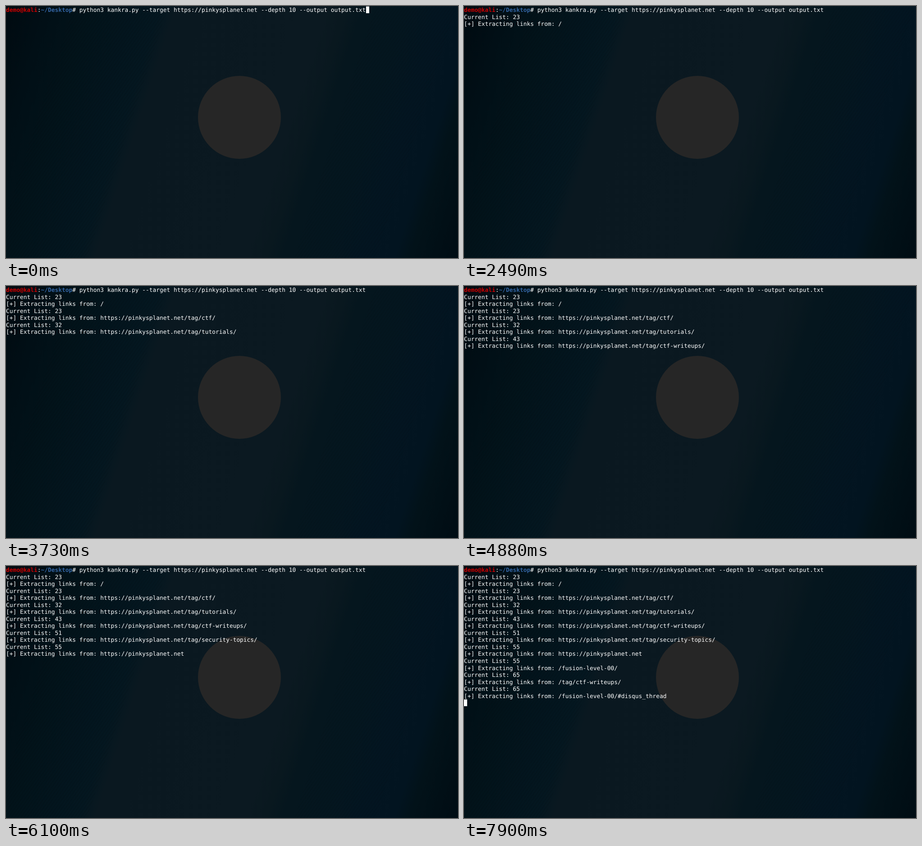
An HTML page with a canvas that plays this animation: 1003x559 px, repeating every 8 s.

```html
<!DOCTYPE html>
<html lang="en">
<head>
<meta charset="utf-8">
<title>Terminal</title>
<style>
  html, body { margin: 0; width: 100%; height: 100%; overflow: hidden; background: #09171f; }
  canvas { display: block; }
</style>
</head>
<body>
<canvas id="stage" width="1003" height="559"></canvas>
<script>
const W = 1003, H = 559, LOOP = 8000;
const ctx = document.getElementById('stage').getContext('2d');

// The terminal is laid out on 8px cells and drawn slightly reduced.
const SCALE = 0.969, CELL = 8, ROW = 15.53, TOP = 0.7, BASELINE = 12.4;
const FONT = '13.29px "DejaVu Sans Mono", monospace';

const SITE = 'https://pinkysplanet.net';
const PROMPT = [
  ['demo@kali', '#cc0000', true],
  [':', '#ffffff', false],
  ['~/Desktop', '#3465a4', true],
  [`# python3 kankra.py --target ${SITE} --depth 10 --output output.txt`, '#ffffff', false]
];
const COMMAND_END = PROMPT.reduce((n, [text]) => n + text.length, 0);

// Each crawl step: time shown, list size, page.
const STEPS = [
  [1900, 23, '/'],
  [2620, 23, SITE + '/tag/ctf/'],
  [3480, 32, SITE + '/tag/tutorials/'],
  [4300, 43, SITE + '/tag/ctf-writeups/'],
  [5010, 51, SITE + '/tag/security-topics/'],
  [5670, 55, SITE],
  [6530, 55, '/fusion-level-00/'],
  [7210, 65, '/tag/ctf-writeups/'],
  [7900, 65, '/fusion-level-00/#disqus_thread']
];
const ENTER = 700;
const BLINKS = [1310, 1900, 2490, 3050, 3730, 4300, 4880, 5550, 6100, 6650, 7210, 7900];

function hatch(g, left, right, lean, color) {
  g.save();
  g.beginPath();
  g.moveTo(left, 0);
  g.lineTo(right, 0);
  g.lineTo(right - 180, H);
  g.lineTo(left - 180, H);
  g.clip();
  g.strokeStyle = color;
  g.lineWidth = 1;
  g.beginPath();
  for (let x = left - 180; x < right + lean; x += 7) {
    g.moveTo(x, 0);
    g.lineTo(x - lean, H);
  }
  g.stroke();
  g.restore();
}

function makeWallpaper() {
  const layer = document.createElement('canvas');
  layer.width = W;
  layer.height = H;
  const g = layer.getContext('2d');
  const bands = g.createLinearGradient(0, 0, 1072, 345);
  [
    [0, '#000a10'], [0.08, '#010f16'], [0.16, '#02131a'], [0.24, '#03151e'],
    [0.29, '#041720'], [0.32, '#0a1820'], [0.6, '#0b1921'], [0.64, '#09181f'],
    [0.67, '#05161e'], [0.75, '#04161f'], [0.82, '#031521'], [0.88, '#021420'],
    [0.91, '#021219'], [1, '#000c13']
  ].forEach(([at, color]) => bands.addColorStop(at, color));
  g.fillStyle = bands;
  g.fillRect(0, 0, W, H);
  hatch(g, 150, 360, 400, 'rgba(0, 6, 10, 0.18)');
  hatch(g, 820, 1000, 400, 'rgba(0, 6, 10, 0.15)');

  g.fillStyle = '#262626';
  g.beginPath();
  g.arc(518, 247, 92, 0, Math.PI * 2);
  g.fill();
  return layer;
}

const wallpaper = makeWallpaper();

function write(text, col, row, color = '#ffffff', bold = false) {
  ctx.font = (bold ? 'bold ' : '') + FONT;
  ctx.fillStyle = color;
  ctx.fillText(text, col * CELL, (TOP + row * ROW + BASELINE) / SCALE);
}

function drawCursor(col, row) {
  const y = Math.round(TOP + row * ROW);
  const bottom = Math.round(TOP + (row + 1) * ROW);
  ctx.fillStyle = '#ffffff';
  ctx.fillRect(Math.ceil(col * CELL * SCALE), y, 7, bottom - y);
}

function draw(t) {
  ctx.drawImage(wallpaper, 0, 0);
  const shown = STEPS.filter(([at]) => t >= at);

  ctx.save();
  ctx.scale(SCALE, SCALE);
  ctx.textRendering = 'geometricPrecision';
  let col = 0;
  for (const [text, color, bold] of PROMPT) {
    write(text, col, 0, color, bold);
    col += text.length;
  }
  shown.forEach(([, size, page], i) => {
    write(`Current List: ${size}`, 0, 1 + 2 * i);
    write(`[+] Extracting links from: ${page}`, 0, 2 + 2 * i);
  });
  ctx.restore();

  const cursorOn = BLINKS.filter(at => t >= at).length % 2 === 0;
  if (t < ENTER) drawCursor(COMMAND_END, 0);
  else if (cursorOn) drawCursor(0, 1 + 2 * shown.length);
}

const start = performance.now();
function tick() {
  draw((performance.now() - start) % LOOP);
  requestAnimationFrame(tick);
}
tick();
</script>
</body>
</html>
```
